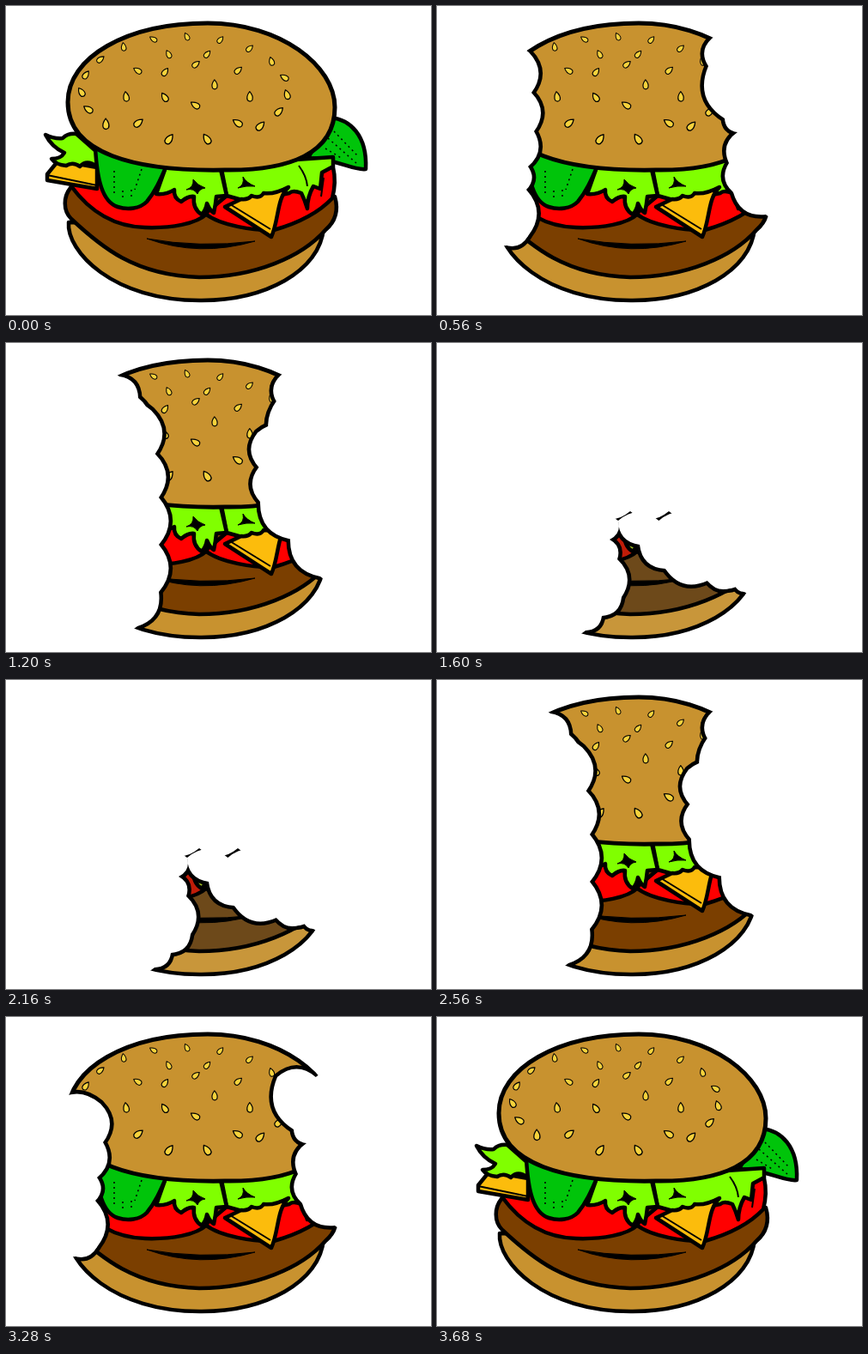
An HTML page with a canvas that plays this animation: 495x360 px, repeating every 3.76 s.

```html
<!DOCTYPE html>
<html>
<head>
<meta charset="utf-8">
<style>
html, body { margin: 0; width: 100%; height: 100%; overflow: hidden; background: #fff; }
canvas { display: block; }
</style>
</head>
<body>
<canvas id="stage" width="495" height="360"></canvas>
<script>
const ctx = document.getElementById('stage').getContext('2d');
const STEP = 80, LOOP = 3760, LAST = 22;
const W = 495, H = 360, BITE = 45;

const fresh = { bun: '#c8922f', patty: '#7b3f00', tomato: '#ff0000', lettuce: '#80ff00', pickle: '#00c40a', cheese: '#fcbc0c', seed: '#f6d23c' };
const dull = { ...fresh, bun: '#c8963a', patty: '#6d491a', tomato: '#c01c08', lettuce: '#a4c424' };

// Fillings from back to front: colour, path
const fillings = [
  ['pickle', 'M378 130C400 132 421 150 419 190C404 192 385 178 352 177Z'],
  ['bun', 'M73 252C70 285 124 344 228 343C300 343 366 310 370 258Z'],
  ['patty', 'M75 212C67 222 66 238 76 248C110 280 150 314 225 316C290 316 345 292 372 261C385 250 387 236 383 222L300 190H110Z'],
  ['tomato', 'M232 242C250 256 290 262 312 261C340 253 365 240 380 224Q385 205 381 188L300 185Z'],
  ['tomato', 'M76 210C98 240 125 257 162 258C192 259 222 254 234 242L230 185H110Z'],
  ['cheese', 'M61 180L106 188V213L48 203V196Z'],
  ['lettuce', 'M46 150Q56 155 66 154Q72 148 82 149L108 172L106 187Q94 178 86 187Q78 181 70 186Q58 185 53 178Q64 178 68 171Q53 164 46 150Z'],
  ['lettuce', 'M250 185L257 221L282 228L330 218Q334 214 344 218Q348 226 351 236Q351 222 358 210L366 213L368 194L381 187V176Z'],
  ['lettuce', 'M187 185L175 219Q187 220 196 214Q195 224 204 228Q212 221 219 222Q217 236 228 243Q233 237 234 230Q238 239 242 241Q244 232 245 222L257 221L249 186Z'],
  ['pickle', 'M104 165C106 202 112 228 130 234C142 238 156 236 164 228C174 216 180 202 187 186Z'],
  ['cheese', 'M255 234L274 225Q282 226 286 221Q296 225 300 218Q312 220 329 211C315 224 318 250 309 269Z']
].map(([color, d]) => [color, new Path2D(d)]);

const topBun = new Path2D('M72 112C72 60 140 20 235 20C320 20 383 70 383 118C383 172 330 192 255 191C150 193 72 172 72 112Z');
const creases = new Path2D('M48 197L106 209M261 231L308 260M341 186Q350 198 351 210M370 200L367 222');
const slits = new Path2D('M164 271Q225 282 290 274Q225 293 164 271ZM210 214Q219 211 218 202Q223 209 232 212Q225 213 223 219Q219 212 210 214ZM270 212Q278 209 276 199Q280 206 290 210Q280 209 270 212Z');
const pores = new Path2D('M126 192V218M136 215V224M146 214V222M158 190L150 214M375 154L408 183M382 146L409 174M372 166L392 178');
const seedShape = new Path2D('M7 0Q1 -5 -4 -3Q-7 0 -4 3Q1 5 7 0Z');

// Split every side into steps of about one bite
function cusps(points, closed) {
  return points.flatMap(([x, y], i) => {
    if (!closed && i === points.length - 1) return [[x, y]];
    const [nx, ny] = points[(i + 1) % points.length];
    const n = Math.max(1, Math.round(Math.hypot(nx - x, ny - y) / BITE));
    return Array.from({ length: n }, (_, k) => [x + (nx - x) * k / n, y + (ny - y) * k / n]);
  });
}

// Closed clockwise path with outward tooth marks
function scallop(points) {
  const path = new Path2D(), marks = cusps(points, true);
  path.moveTo(...marks[0]);
  marks.forEach(([x, y], i) => {
    const [nx, ny] = marks[(i + 1) % marks.length];
    path.quadraticCurveTo((x + nx) / 2 + (ny - y) * 0.42, (y + ny) / 2 - (nx - x) * 0.42, nx, ny);
  });
  path.closePath();
  return path;
}

const bites = [];
const bite = (stage, points) => bites.push([stage, scallop(points)]);

// Eat both sides back to the given edges, from the bottom upwards
function nibble(from, to, left, right) {
  const slices = [[left, 0], [right, W]].flatMap(([edge, out]) =>
    cusps(edge).slice(1).map((end, i) => {
      const start = cusps(edge)[i];
      const points = [[out, start[1]], start, end, [out, end[1]]];
      return out ? points.reverse() : points;
    }));
  const depth = slice => Math.max(...slice.map(p => p[1]));
  slices.sort((a, b) => depth(b) - depth(a));
  slices.forEach((slice, i) => bite(from + Math.ceil((i + 1) / slices.length * (to - from)), slice));
}

const biteTop = (stage, y) => bite(stage, [[0, -20], [W, -20], [W, y], [0, y]]);

nibble(0, 6,
  [[107, 54], [110, 101], [113, 146], [106, 187], [104, 214], [106, 268], [78, 278]],
  [[320, 38], [316, 70], [335, 131], [350, 147], [340, 183], [345, 217], [383, 243]]);
nibble(6, 10,
  [[132, 39], [154, 64], [162, 104], [148, 152], [148, 192], [162, 222], [162, 262], [141, 292], [102, 291], [86, 291]],
  [[320, 38], [316, 66], [321, 129], [312, 189], [338, 222], [354, 237], [371, 262]]);
nibble(10, 15,
  [[165, 28], [178, 180], [178, 290], [153, 330]],
  [[290, 24], [296, 185], [366, 272]]);
nibble(15, 19,
  [[211, 207], [201, 229], [210, 252], [215, 296], [192, 318], [173, 335]],
  [[211, 207], [236, 235], [266, 263], [315, 277], [347, 283], [362, 289]]);
for (let stage = 16; stage < 20; stage++) biteTop(stage, (stage - 15) * 49);
bite(20, [[290, 230], [W, 230], [W, H], [328, H]]);
biteTop(21, 228);

function shape(path, fill, width) {
  ctx.fillStyle = fill;
  ctx.lineWidth = width;
  ctx.fill(path);
  ctx.stroke(path);
}

function line(path, width, dash = []) {
  ctx.lineWidth = width;
  ctx.setLineDash(dash);
  ctx.stroke(path);
  ctx.setLineDash([]);
}

// Part of an elliptic ring of seeds, angles in radians
function seedRing(color, count, x, y, rx, ry, start, sweep) {
  for (let i = 0; i < count; i++) {
    const angle = start + sweep * i / count;
    const sy = y + ry * Math.sin(angle), size = 0.65 + sy / 400;
    ctx.save();
    ctx.translate(x + rx * Math.cos(angle), sy);
    ctx.rotate(-1.6 + Math.sin(i * 5));
    ctx.scale(size, size);
    shape(seedShape, color, 1.3);
    ctx.restore();
  }
}

function drawBurger(colors) {
  for (const [color, path] of fillings) shape(path, colors[color], 4.5);
  line(creases, 2);
  line(pores, 1.5, [2, 4]);
  shape(slits, '#000', 1);
  shape(topBun, colors.bun, 5);
  seedRing(colors.seed, 15, 208, 98, 120, 62, 2.44, 4.92);
  seedRing(colors.seed, 10, 212, 106, 72, 52, 0, 6.28);
  seedRing(colors.seed, 5, 211, 92, 32, 25, 0, 6.28);
}

function draw(stage) {
  ctx.globalCompositeOperation = 'source-over';
  ctx.clearRect(0, 0, W, H);
  if (stage === LAST) return;
  ctx.strokeStyle = '#000';
  ctx.lineJoin = 'round';
  drawBurger(stage > 15 ? dull : fresh);
  const taken = bites.filter(([at]) => at <= stage);
  ctx.globalCompositeOperation = 'source-atop';
  taken.forEach(([, path]) => line(path, 9));
  ctx.globalCompositeOperation = 'destination-out';
  taken.forEach(([, path]) => ctx.fill(path));
}

// Eaten stage by stage, then restored in reverse
function frame() {
  const tick = Math.floor(performance.now() % LOOP / STEP);
  draw(Math.max(0, Math.min(tick, 47 - tick) - 1));
  requestAnimationFrame(frame);
}
frame();
</script>
</body>
</html>
```
